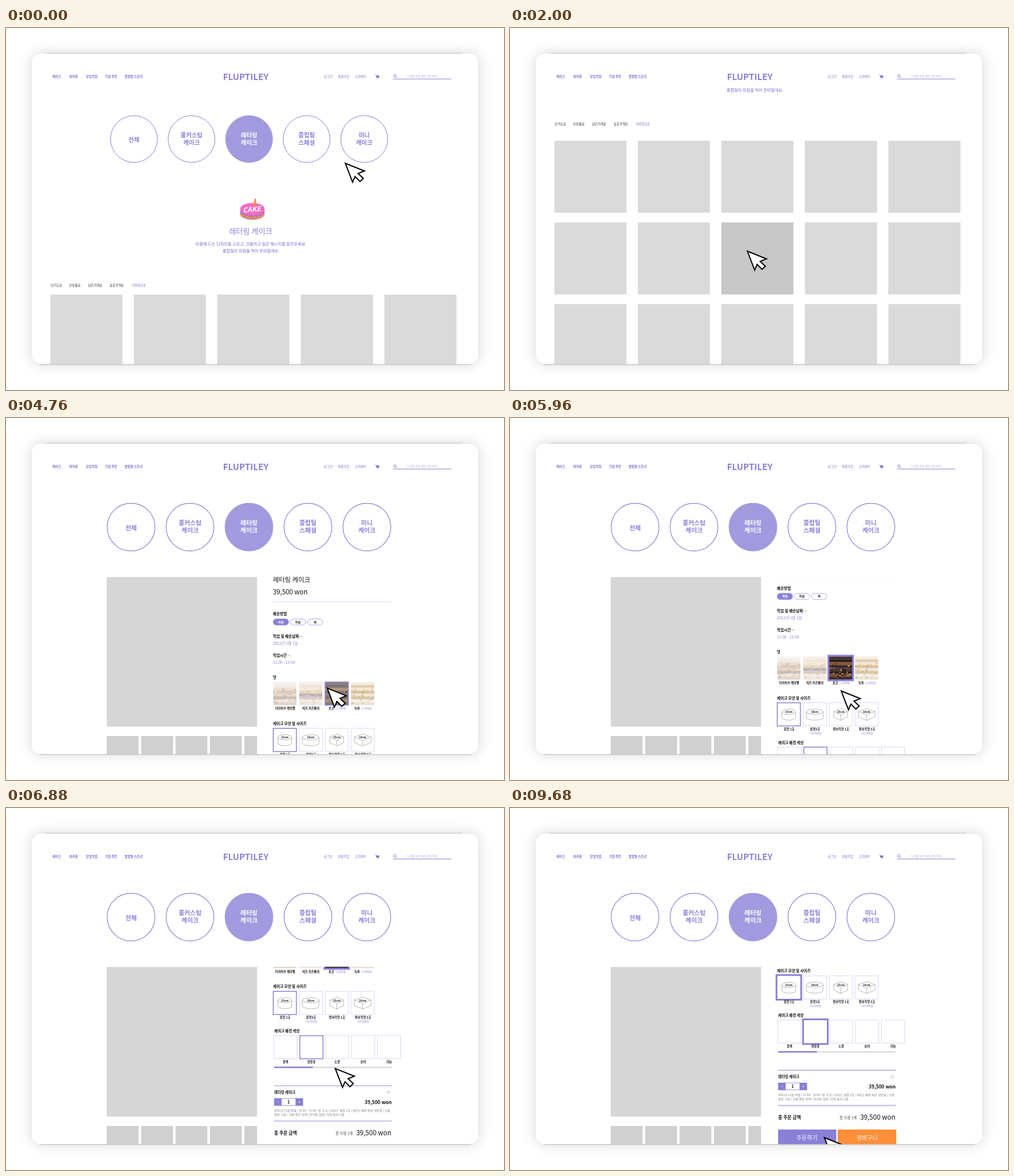
An HTML page with a canvas for the animation above (10 s loop, 860x626 px).

```html
<!DOCTYPE html>
<html lang="ko">
<head>
<meta charset="utf-8">
<title>Cake shop walkthrough</title>
<style>
html, body { margin: 0; width: 860px; height: 626px; overflow: hidden; background: #fff; }
canvas { display: block; }
</style>
</head>
<body>
<canvas id="stage" width="860" height="626"></canvas>
<script>
const ctx = document.getElementById('stage').getContext('2d');
const LOOP = 10000;
const FONT = '"Noto Sans CJK KR", "Noto Sans CJK", "Noto Sans", sans-serif';
const PURPLE = '#8a80d8', FILL = '#a29ade', PALE = '#dad7f3', ORANGE = '#ff8f3a';
const BRAND = 'FLUPTILEY', BRAND_KO = '플럽틸';

// ---- time helpers ----
const clamp = u => Math.max(0, Math.min(1, u));
const span = (t, a, b) => clamp((t - a) / (b - a));
const inOut = (u, p = 2) => u < .5 ? Math.pow(2 * u, p) / 2 : 1 - Math.pow(2 - 2 * u, p) / 2;

function track(t, keys) {
  for (let i = 1; i < keys.length; i++) {
    const [t0, v0] = keys[i - 1], [t1, v1] = keys[i];
    if (t < t1) return v0 + (v1 - v0) * span(t, t0, t1);
  }
  return keys[keys.length - 1][1];
}

// start, end, x, y, power of the horizontal easing
const MOVES = [
  [1280, 1840, 410, 386, 2],
  [2560, 3240, 475, 445, 2],
  [4200, 5000, 572, 472, 2],
  [6700, 7400, 478, 312, 4],
  [7560, 8060, 525, 392, 2],
  [8300, 9080, 543, 570, 2]
];

function cursorAt(t) {
  let x = 586, y = 234;
  for (const [a, b, nx, ny, p] of MOVES) {
    const u = span(t, a, b);
    x += (nx - x) * inOut(u, p);
    y += (ny - y) * inOut(u);
  }
  return [x, y];
}

// ---- drawing helpers ----
function text(s, x, y, size, color = '#111', weight = 700, align = 'left') {
  ctx.font = `${weight} ${size}px ${FONT}`;
  ctx.textAlign = align;
  ctx.fillStyle = color;
  ctx.fillText(s, x, y + size * .37);
}

function rect(x, y, w, h, color) {
  ctx.fillStyle = color;
  ctx.fillRect(x, y, w, h);
}

function frame(x, y, w, h, color, width = 1) {
  ctx.strokeStyle = color;
  ctx.lineWidth = width;
  ctx.strokeRect(x, y, w, h);
}

function line(x0, y0, x1, y1, color, width = 1) {
  poly([[x0, y0], [x1, y1]]);
  ctx.strokeStyle = color;
  ctx.lineWidth = width;
  ctx.stroke();
}

function poly(points, close) {
  ctx.beginPath();
  points.forEach(([x, y]) => ctx.lineTo(x, y));
  if (close) ctx.closePath();
}

function round(x, y, w, h, r) {
  ctx.beginPath();
  ctx.roundRect(x, y, w, h, r);
}

function clipped(x, y, w, h, draw) {
  ctx.save();
  ctx.beginPath();
  ctx.rect(x, y, w, h);
  ctx.clip();
  draw();
  ctx.restore();
}

// ---- shared parts ----
function device() {
  ctx.save();
  ctx.shadowColor = 'rgba(0,0,0,.15)';
  ctx.shadowBlur = 22;
  round(43, 43, 774, 539, 17);
  ctx.fillStyle = '#fff';
  ctx.fill();
  ctx.restore();
}

function deviceEdge() {
  round(43.5, 43.5, 773, 538.5, 17);
  ctx.strokeStyle = '#e2e2e2';
  ctx.lineWidth = 1;
  ctx.stroke();
  line(70, 43.5, 788, 43.5, '#bdbdbd');
  line(58, 582, 803, 582, '#bdbdbd');
}

function header() {
  rect(44, 44, 772, 57.5, '#fff');
  [['케이크', 80], ['마카롱', 109], ['당일픽업', 138], ['기업 주문', 171], [BRAND_KO + ' 스토리', 205]]
    .forEach(([s, x]) => text(s, x, 84, 5.4, '#7468cc'));
  text(BRAND, 414, 84, 15, PURPLE, 900, 'center');
  [['로그인', 549], ['회원가입', 573], ['고객센터', 602]]
    .forEach(([s, x]) => text(s, x, 84, 5.4, '#7468cc', 500));

  // cart
  poly([[637.5, 81.3], [639, 81.3], [640.3, 85.5], [644, 85.5]]);
  ctx.strokeStyle = '#7468cc';
  ctx.lineWidth = .8;
  ctx.stroke();
  poly([[639.4, 82], [645, 82.5], [644, 85], [640, 85]], true);
  ctx.fillStyle = '#7468cc';
  ctx.fill();
  rect(640, 86.3, 1.2, 1.2, '#7468cc');
  rect(643, 86.3, 1.2, 1.2, '#7468cc');

  // search
  ctx.beginPath();
  ctx.arc(671.5, 82.7, 2, 0, 7);
  ctx.stroke();
  line(673, 84.3, 675, 86.2, '#7468cc', .9);
  text('누구를 위한 케이크인가요?', 692, 83.5, 4.9, '#a9a3de', 400);
  line(668, 88.2, 769, 88.2, PURPLE);
}

const MENU = [['전체'], ['풀커스텀', '케이크'], ['레터링', '케이크'], [BRAND_KO, '스페셜'], ['미니', '케이크']];

function menu(x, y, step, r, size, width) {
  MENU.forEach((words, i) => {
    const cx = x + step * i, on = i === 2;
    ctx.beginPath();
    ctx.arc(cx, y, r, 0, 7);
    ctx.fillStyle = on ? FILL : '#fff';
    ctx.fill();
    ctx.strokeStyle = on ? FILL : PURPLE;
    ctx.lineWidth = width;
    ctx.stroke();
    words.forEach((w, k) => {
      const wy = words.length > 1 ? y - 7.3 + 13 * k : y + 1.5;
      text(w, cx, wy, size, on ? '#fff' : PURPLE, 700, 'center');
    });
  });
}

// ---- list page ----
function cake(x, y) {
  const body = top => {
    ctx.beginPath();
    ctx.ellipse(x, top, 21, 10, 0, Math.PI, 0, true);
    ctx.lineTo(x + 21, y + 9);
    ctx.ellipse(x, y + 9, 21, 10, 0, 0, Math.PI);
    ctx.closePath();
  };
  body(y);
  ctx.fillStyle = '#8478dc';
  ctx.fill();
  for (const [dy, color] of [[4, '#e868bd'], [9, ORANGE]]) {
    ctx.beginPath();
    for (let i = -20; i <= 20; i++) {
      const arc = Math.sqrt(1 - i * i / 441) * 9;
      ctx.lineTo(x + i, y + dy + arc - 2 + Math.sin(i * .95) * 1.4);
    }
    ctx.strokeStyle = color;
    ctx.lineWidth = 2.6;
    ctx.stroke();
  }
  ctx.beginPath();
  ctx.ellipse(x, y, 21, 10, 0, 0, 7);
  ctx.fillStyle = '#f56cc3';
  ctx.fill();
  line(x + 4.3, y - 13, x + 5, y - 4, ORANGE, 4);
  ctx.beginPath();
  ctx.ellipse(x + 5, y - 15, 1.2, 2.3, .2, 0, 7);
  ctx.fillStyle = '#f2603d';
  ctx.fill();
  ctx.save();
  ctx.translate(x, y + 1);
  ctx.transform(1, -.08, -.12, 1, 0, 0);
  text('CAKE', 0, 0, 12, '#fff', 900, 'center');
  ctx.restore();
}

function listPage(t) {
  const go = 1 - Math.pow(1 - span(t, 440, 1240), 1.8);
  const up = 278.5 * go;
  menu(221, 192 - up, 99.4, 40.5, 10.3, 1);
  cake(425.5, 312.5 - up);
  text('레터링 케이크', 422.5, 351 - up, 13, PURPLE, 500, 'center');
  text('마음에 드는 디자인을 고르고, 선물하고 싶은 메시지를 알려주세요.', 423, 373.5 - up, 7.1, '#7468cc', 500, 'center');
  text(BRAND_KO + '이 마음을 적어 준비할게요.', 423, 385.5 - up, 7.1, '#7468cc', 500, 'center');
  [['인기도순', 77], ['신상품순', 109], ['낮은가격순', 141.5], ['높은가격순', 179], ['리뷰많은순', 217]]
    .forEach(([s, x], i) => text(s, x, 445 - up, 5.4, i === 4 ? '#7468cc' : '#222', 500));

  const top = 461 - 266 * go, hover = span(t, 1680, 1840);
  for (let i = 0; i < 15; i++) {
    const x = 76.6 + i % 5 * 144.2, y = top + Math.floor(i / 5) * 141.2;
    const shade = i === 7 ? 218 - 19 * hover : 218;
    rect(x, y, 124.5, 124.5, `rgb(${shade},${shade},${shade})`);
  }
}

// ---- detail page ----
const PHOTOS = [
  ['#f4efec', '#efe6df', '#e6d3c2', '#cfb9a4', '#e3cdb6', '#b9a9a0', '#e9ddd2', '#d8c8b8'],
  ['#f3e9e4', '#eddcd3', '#f0e3d2', '#e3cba9', '#a39a9f', '#c9bcbb', '#f0e6da', '#eadfd6'],
  ['#453230', '#2c2020', '#8a5630', '#33272a', '#4a332c', '#2a2022', '#7b4a2c', '#3c2c2a'],
  ['#f1ead9', '#d9bf94', '#efe4cf', '#cfae78', '#eadfca', '#c9b48a', '#f3ecdc', '#e4d9c4']
];

function photo(i, x, y, alpha) {
  const bands = PHOTOS[i], size = 40;
  ctx.save();
  ctx.globalAlpha *= alpha;
  bands.forEach((c, k) => rect(x, y + k * 5, size, 5.2, c));
  let seed = 17 + i * 31;
  const rnd = () => (seed = seed * 16807 % 2147483647) / 2147483647;
  const specks = i === 2 ? ['#d7a27c', '#8a5630', '#191416'] : [bands[3], bands[5], bands[0]];
  for (let k = 0; k < 36; k++) {
    rect(x + rnd() * 36, y + 10 + rnd() * 26, 1 + rnd() * 3, 1 + rnd() * 2, specks[k % 3]);
  }
  ctx.restore();
}

function option(x, y, on, hover) {
  const grow = on ? hover * 1.3 : 0;
  frame(x - grow, y - grow, 40 + 2 * grow, 40 + 2 * grow, on ? PURPLE : PALE, on ? 1.5 + hover * 1.5 : 1);
}

function shape(i, x, y) {
  const w = i % 2 ? 14.5 : 12;
  ctx.strokeStyle = '#999';
  ctx.lineWidth = .7;
  if (i < 2) {
    ctx.beginPath();
    ctx.ellipse(x, y + 15.5, w, 4.5, 0, 0, 7);
    ctx.moveTo(x + w, y + 15.5);
    ctx.lineTo(x + w, y + 25.5);
    ctx.ellipse(x, y + 25.5, w, 4.5, 0, 0, Math.PI);
    ctx.lineTo(x - w, y + 15.5);
  } else {
    poly([[x, y + 10], [x + w, y + 15], [x, y + 21], [x - w, y + 15], [x, y + 10]]);
    ctx.moveTo(x - w, y + 15);
    ctx.lineTo(x - w, y + 24.5);
    ctx.lineTo(x, y + 30.5);
    ctx.lineTo(x + w, y + 24.5);
    ctx.lineTo(x + w, y + 15);
    ctx.moveTo(x, y + 21);
    ctx.lineTo(x, y + 30.5);
  }
  ctx.stroke();
  text(i % 2 ? '18cm' : '15cm', x, y + 16, 4.8, '#111', 700, 'center');
}

function caret(x, y) {
  poly([[x - 1.5, y - .8], [x + 1.5, y - .8], [x, y + 1.3]], true);
  ctx.fillStyle = PURPLE;
  ctx.fill();
}

function orderForm(t) {
  text('레터링 케이크', 461, 280, 11.2, '#111', 500);
  text('39,500 won', 461, 301, 11.3, '#111', 500);
  line(461, 318, 666, 318, PALE);

  text('배송방법', 461, 338.5, 6.5);
  ['택배', '픽업', '퀵'].forEach((s, i) => {
    const x = 461.5 + i * 29.5;
    round(x, 347.5, 26.5, 10.5, 5.25);
    ctx.fillStyle = i ? '#fff' : PURPLE;
    ctx.fill();
    ctx.strokeStyle = i ? '#a8a1e2' : PURPLE;
    ctx.lineWidth = .9;
    ctx.stroke();
    text(s, x + 13.2, 352.8, 5, i ? '#111' : '#fff', 700, 'center');
  });

  text('픽업 및 배송날짜', 461, 378, 6.5);
  caret(510, 378);
  text('2022년 2월 1일', 461, 390, 6.6, PURPLE, 500);
  text('픽업시간', 461, 410.5, 6.5);
  caret(489, 411);
  text('12:00 - 13:00', 461, 423, 6.6, PURPLE, 500);

  text('맛', 461, 448.5, 6.5);
  const choco = span(t, 4840, 5040);
  for (let i = 0; i < 4; i++) {
    const x = 461.5 + i * 44.8;
    photo(i, x, 456.5, i === 2 ? .62 + .38 * choco : .75);
    if (i === 2) option(x, 456.5, true, choco);
  }
  text('티라미수 캐러멜', 482, 502.5, 5.2, '#111', 700, 'center');
  text('치즈 라즈베리', 526.5, 502.5, 5.2, '#111', 700, 'center');
  [['초코', 557], ['녹차', 601.5]].forEach(([s, x]) => {
    text(s, x, 502.5, 5.2);
    text('+2,000원', x + 11.5, 502.5, 4.6, PURPLE, 500);
  });

  text('케이크 모양 및 사이즈', 461, 528.5, 6.5);
  ['원형 1호', '원형2호', '정사각형 1호', '정사각형 2호'].forEach((s, i) => {
    const x = 461.5 + i * 44.8;
    option(x, 536.7, !i, span(t, 7320, 7440));
    shape(i, x + 20, 536.7);
    text(s, x + 20.5, 582, 5.2, '#111', 700, 'center');
    if (i % 2) text('+10,000원', x + 20.5, 589, 4.7, PURPLE, 500, 'center');
  });

  text('케이크 배경 색상', 463, 605.5, 6.4);
  ['흰색', '연분홍', '노랑', '보라', '하늘'].forEach((s, i) => {
    const x = 462.7 + i * 44.7;
    option(x, 613.3, i === 1, span(t, 7980, 8100));
    text(s, x + 20, 659, 5.2, '#111', 700, 'center');
  });
  line(463, 668.2, 666, 668.2, '#dcdcdc', 2.6);
  line(463, 668.2, 530, 668.2, PURPLE, 2.6);

  line(463, 700, 666, 700, '#bdb7e8', 1.8);
  text('레터링 케이크', 463, 711.5, 6.4);
  line(657.5, 708.5, 663, 714, '#a8a1e2', .9);
  line(663, 708.5, 657.5, 714, '#a8a1e2', .9);
  rect(463, 721.5, 50, 13, PURPLE);
  rect(476, 722.3, 24, 11.4, '#fff');
  text('−', 469.5, 728, 7, '#fff', 400, 'center');
  text('1', 488, 728, 7, '#111', 700, 'center');
  text('+', 506.5, 728, 7, '#fff', 400, 'center');
  text('39,500 won', 666, 728.3, 8.3, '#111', 700, 'right');
  text('2021년 11월 30일 / 12:00 - 13:00 / 맛: 초코 / 사이즈: 원형 1호 / 케이크 배경 색상: 연분홍 / 크림', 463, 743, 5.05, '#777', 400);
  text('종류: 기본 / 크림 색상: 흰색 / 온더탑: 없음 / 등등 옵션 나열', 463, 750, 5.05, '#777', 400);
  line(463, 761, 666, 761, '#bdb7e8', 1.8);

  text('총 주문 금액', 463, 781.5, 7.8);
  text('총 수량 1개', 569, 781.8, 6.4, '#444', 400);
  text('39,500 won', 665.5, 781.5, 11.5, '#111', 500, 'right');

  rect(463, 802.5, 100.5, 30, PURPLE);
  rect(566, 802.5, 101, 30, ORANGE);
  text('주문하기', 512.7, 816.7, 9.8, '#fff', 500, 'center');
  text('장바구니', 616.7, 816.7, 9.8, '#fff', 500, 'center');
}

function detailPage(t) {
  rect(44, 44, 772, 538, '#fff');
  menu(216, 188.6, 101.8, 41.3, 10.7, 1.2);
  rect(174, 275, 259.5, 258.7, '#d6d6d6');
  clipped(174, 550, 259.5, 32, () => {
    for (let i = 0; i < 5; i++) rect(174 + i * 59.4, 550, 55, 40, '#d0d0d0');
  });
  const up = track(t, [[5700, 0], [5960, 44], [6880, 219.5], [7080, 246.5]]);
  clipped(455, 274.5, 250, 308, () => {
    ctx.translate(0, -up);
    orderForm(t);
  });
}

function cursor([x, y]) {
  const shapePts = [[0, 0], [33, 13.2], [22, 17.6], [31, 26], [25.3, 31.4], [16.8, 22.8], [12.5, 32.6]];
  poly(shapePts.map(([a, b]) => [x + a, y + b]), true);
  ctx.fillStyle = '#fff';
  ctx.fill();
  ctx.strokeStyle = '#000';
  ctx.lineWidth = 2;
  ctx.lineJoin = 'miter';
  ctx.stroke();
}

function draw(t) {
  rect(0, 0, 860, 626, '#fff');
  device();
  ctx.save();
  round(43, 43, 774, 539, 17);
  ctx.clip();
  const swap = span(t, 2240, 2480);
  if (swap < 1) listPage(t);
  if (swap > 0) {
    ctx.save();
    ctx.globalAlpha = swap;
    detailPage(t);
    ctx.restore();
  }
  header();
  cursor(cursorAt(t));
  ctx.restore();
  deviceEdge();
}

const start = performance.now();
function tick() {
  draw((performance.now() - start) % LOOP);
  requestAnimationFrame(tick);
}
tick();
</script>
</body>
</html>
```
